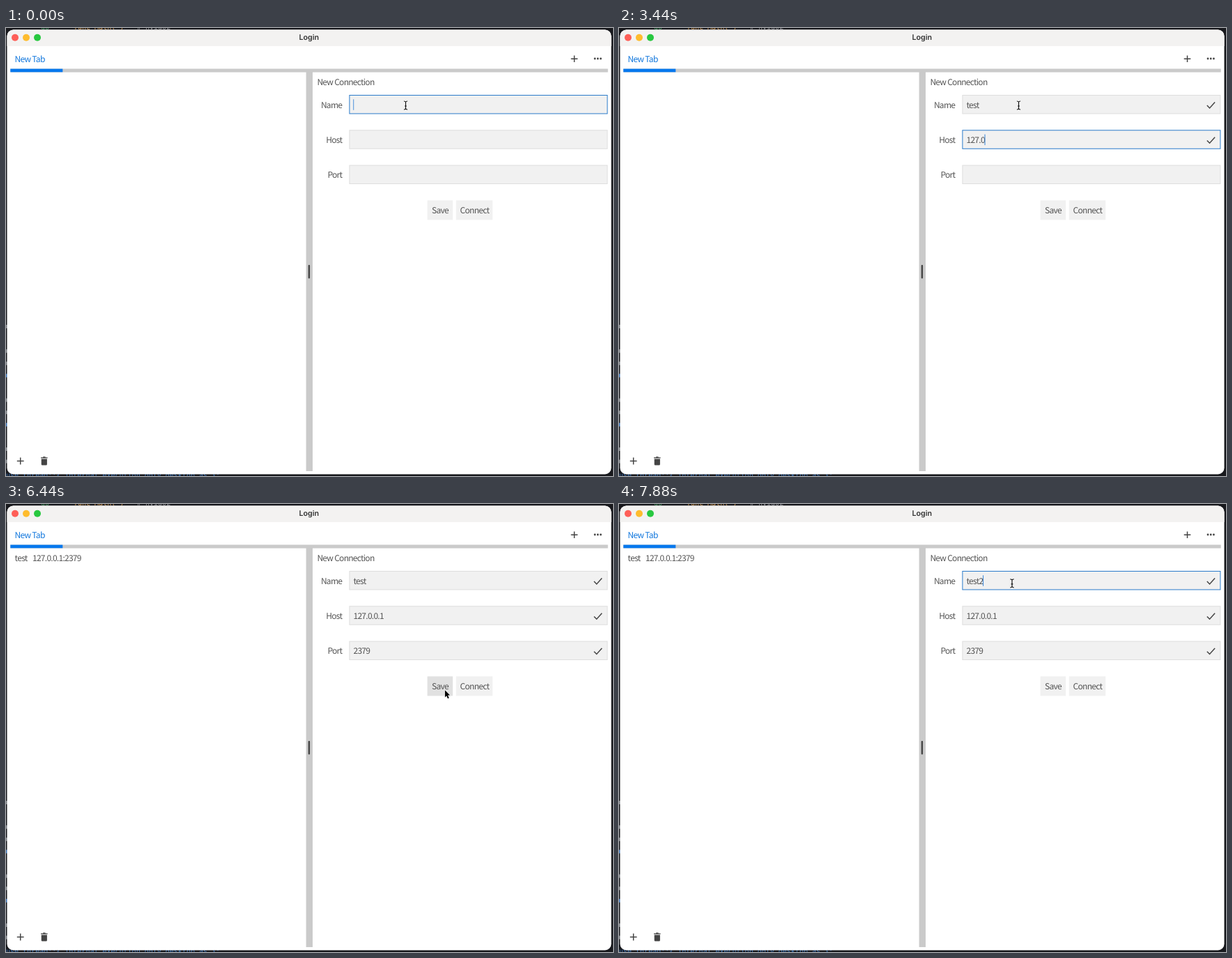
These frames come from a looping animation (871x643 px, 8000 ms). An HTML page:

```html
<!DOCTYPE html>
<html lang="en">
<head>
<meta charset="utf-8">
<title>Login</title>
<style>
html, body { margin: 0; width: 100%; height: 100%; overflow: hidden; background: #18191d; }
svg { display: block; }
text {
  font: 12px "Noto Sans CJK SC", "Noto Sans CJK JP", "Noto Sans CJK", sans-serif;
  letter-spacing: -.73px; fill: #555; text-rendering: geometricPrecision; white-space: pre;
}
.title { font: 600 10.7px Inter, sans-serif; letter-spacing: 0; fill: #333; }
.code { font: 10px "DejaVu Sans Mono", monospace; letter-spacing: 0; fill: #8b8d93; }
.icon { fill: none; stroke: #444; stroke-width: 1.5; }
</style>
</head>
<body>
<svg width="871" height="643" viewBox="0 0 871 643">
  <rect width="871" height="643" fill="#18191d"/>
  <g id="desktop">
    <text class="code" x="50" y="2" style="fill:#3f8f5a">go</text>
    <text class="code" x="97" y="2" style="fill:#d29a55">func Math( )</text>
    <text class="code" x="188" y="2"># nvid02</text>
    <text class="code" x="0" y="645" style="fill:#3c74b8">use thread::{ internal execution only desktop as };</text>
  </g>
  <rect x="1.5" y="2.5" width="867" height="638" rx="9" fill="#fff"/>
  <path d="M1.5 26V11.5a9 9 0 0 1 9-9H859.5a9 9 0 0 1 9 9V26z" fill="#f3f2f1"/>
  <circle cx="13" cy="13.7" r="5" fill="#fe5f58"/>
  <circle cx="29" cy="13.7" r="5" fill="#febc2e"/>
  <circle cx="45" cy="13.7" r="5" fill="#28c840"/>
  <text class="title" x="434.7" y="17.3" text-anchor="middle">Login</text>

  <text x="12.6" y="48.6" style="fill:#1177dd">New Tab</text>
  <path class="icon" d="M810.7 44.2h9.6M815.5 39.4v9.6"/>
  <g fill="#444"><circle cx="845" cy="44" r="1.4"/><circle cx="849.2" cy="44" r="1.4"/><circle cx="853.4" cy="44" r="1.4"/></g>
  <path d="M6.3 58.6H863.7V63.5H440V636H430.6V63.5H6.3z" fill="#cacaca"/>
  <rect x="6.3" y="58.6" width="75" height="4.7" fill="#0678ee"/>
  <rect x="433.7" y="340" width="2.4" height="19.5" rx="1" fill="#444"/>

  <path class="icon" d="M15.8 621.5h9.8M20.7 616.6v9.8"/>
  <path d="M50 616.2h2.6l.8-1h2.8l.8 1h2.6v1.4H50zM50.7 618.4h8.2v7.8q0 1.3-1.3 1.3h-5.6q-1.3 0-1.3-1.3z" fill="#444"/>

  <text id="entry" x="12.6" y="81.7">test  <tspan x="38">127.0.0.1:2379</tspan></text>
  <text x="446.4" y="81.7">New Connection</text>
  <g id="form"></g>
  <rect id="save" x="604.6" y="247.4" width="36.5" height="28"/>
  <rect x="645.8" y="247.4" width="52.5" height="28" fill="#f1f1f1"/>
  <text x="623" y="265.6" text-anchor="middle">Save</text>
  <text x="672.4" y="265.6" text-anchor="middle">Connect</text>

  <defs><path id="beam" d="M-2.6-6q2 0 2.6 1.2Q.6-6 2.6-6M0-4.8V4.8M-2.6 6q2 0 2.6-1.2Q.6 6 2.6 6M-1.4 1h2.8"/></defs>
  <g id="ibeam" fill="none">
    <use href="#beam" stroke="#fff" stroke-width="2.6" opacity=".8"/>
    <use href="#beam" stroke="#111" stroke-width="1.2"/>
  </g>
  <path id="arrow" d="M0 0V10.2L2.3 8.1L4 12L5.8 11.2L4.1 7.4H7.2z" stroke="#fff" stroke-width=".9" paint-order="stroke"/>
</svg>
<script>
const LOOP = 8000, FRAME = 40;
const LEFT = 492.9, RIGHT = 862.9, TOP = 96.5, PITCH = 50.3, HEIGHT = 26.45;
const FADE_DELAY = 120, FADE = 300, HOLD = 440;
const SAVE_AT = 6400, CLICK_AT = 7320;
const $ = id => document.getElementById(id);
const clamp = u => Math.max(0, Math.min(1, u));

function add(parent, tag, attrs, content = '') {
  const node = document.createElementNS('http://www.w3.org/2000/svg', tag);
  for (const key in attrs) node.setAttribute(key, attrs[key]);
  node.textContent = content;
  return parent.appendChild(node);
}

// Each entry is one stretch of focus; rush > 0 makes its early keys come faster.
const entries = [
  { field: 0, prefix: '', keys: 'test', focus: -380, blur: 1600, first: 1040, last: 1440, rush: 0 },
  { field: 1, prefix: '', keys: '127.0.0.1', focus: 1600, blur: 4280, first: 2000, last: 4040, rush: .35 },
  { field: 2, prefix: '', keys: '2379', focus: 4280, blur: SAVE_AT, first: 4720, last: 5440, rush: 0 },
  { field: 0, prefix: 'test', keys: '2', focus: CLICK_AT, blur: LOOP, first: 7880, last: 7880, rush: 0 }
];
for (const e of entries) {
  e.times = [...e.keys].map((_, i) => {
    const u = i / Math.max(1, e.keys.length - 1);
    return e.first + (e.last - e.first) * u * (1 + e.rush * (1 - u));
  });
}

const fields = ['Name', 'Host', 'Port'].map((label, i) => {
  const form = $('form'), y = TOP + PITCH * i, base = y + 18.1;
  add(form, 'text', { x: 482.2, y: base, 'text-anchor': 'end' }, label);
  return {
    y,
    box: add(form, 'rect', { x: LEFT, y, width: RIGHT - LEFT, height: HEIGHT, fill: '#f1f1f1' }),
    text: add(form, 'text', { x: 498.5, y: base }),
    caret: add(form, 'rect', { y: y + 5.8, width: 1, height: 15.5, fill: '#3584d8' }),
    check: add(form, 'path', { class: 'icon', d: `M843.8 ${y + 14.6}l3.7 3.8l7.6-8.4` })
  };
});

// Slivers of the code lines behind the window's left edge.
for (let line = 0; line < 12; line++) {
  if (line % 4 === 1) continue;
  const fill = line && line % 4 === 0 ? '#3c74b8' : '#777a80';
  add($('desktop'), 'rect', { x: 0, y: 426 + 17.6 * line, width: 2, height: 5, fill });
}

// Fades in after focus, holds, then fades out; a key press restarts the hold.
function caretOpacity(entry, t) {
  const pressed = entry.times.filter(at => at <= t).pop();
  const age = pressed === undefined ? t - entry.focus - FADE_DELAY : t - pressed + FADE;
  return clamp(age / FADE) * (1 - clamp((age - FADE - HOLD) / FADE));
}

const home = { x: 573.5, y: 111 }, button = { x: 629.9, y: 267.2 }, rest = { x: 564, y: 113.8 };
const arrive = (t, from) => 1 - (1 - clamp((t - from) / 480)) ** 6;
function pointerAt(t) {
  const out = arrive(t, 5760), back = arrive(t, 6800);
  const along = k => home[k] + (button[k] - home[k]) * out + (rest[k] - button[k]) * back;
  return { x: along('x'), y: along('y') };
}

function show(node, visible) {
  node.setAttribute('visibility', visible ? 'visible' : 'hidden');
}

function render(t) {
  fields.forEach((f, i) => {
    const entry = entries.filter(e => e.field === i && e.focus <= t).pop();
    const focused = entry && t < entry.blur;
    const value = entry ? entry.prefix + entry.keys.slice(0, entry.times.filter(at => at <= t).length) : '';
    f.text.textContent = value;
    f.caret.setAttribute('x', 498.2 + (value ? f.text.getComputedTextLength() : 0));
    f.caret.setAttribute('opacity', focused ? caretOpacity(entry, t) : 0);
    f.box.setAttribute('stroke', focused ? '#2a7bca' : '#dedede');
    show(f.check, value);
  });

  const { x, y } = pointerAt(t);
  const overField = x > LEFT && x < RIGHT && fields.some(f => y > f.y && y < f.y + HEIGHT);
  const overSave = x > 604 && x < 641 && y > 247 && y < 275.5;
  for (const id of ['ibeam', 'arrow']) {
    $(id).setAttribute('transform', `translate(${x} ${y})`);
    show($(id), (id === 'ibeam') === overField);
  }
  $('save').setAttribute('fill', overSave ? '#e1e1e1' : '#f1f1f1');
  show($('entry'), t >= SAVE_AT + FRAME);
}

const start = performance.now();
function tick() {
  const t = (performance.now() - start) % LOOP;
  render(Math.floor(t / FRAME) * FRAME);
  requestAnimationFrame(tick);
}
tick();
</script>
</body>
</html>
```
